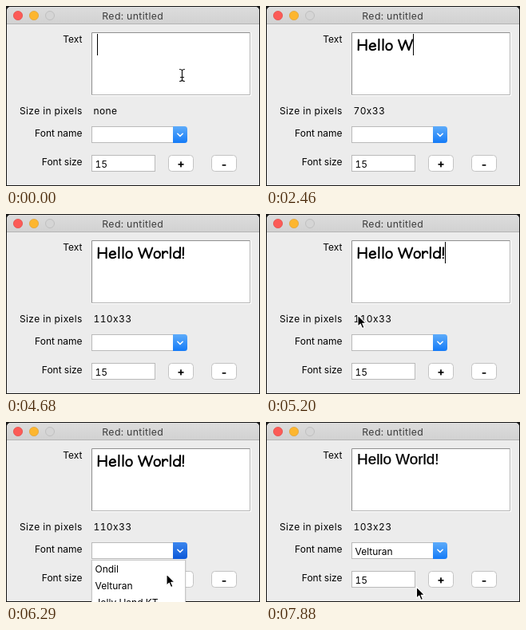
Animation of 318x226 px, one loop 8 s. Source, as an HTML page:

```html
<!DOCTYPE html>
<html lang="en">
<head>
<meta charset="utf-8">
<title>Font size demo</title>
<style>
html, body { margin: 0; width: 100%; height: 100%; overflow: hidden; background: #161616; }
svg { display: block; width: 100vw; height: 100vh; }
text { font: 12px Inter, Roboto, sans-serif; font-variant-numeric: tabular-nums; fill: #000; white-space: pre; }
.label { text-anchor: end; }
.mid { text-anchor: middle; }
.wide { letter-spacing: .4px; }
.title { font-size: 12.3px; letter-spacing: .35px; fill: #3c3c3c; }
.bold { font-weight: 700; font-size: 14px; }
.plain { font: 18.9px "Liberation Sans", sans-serif; stroke: #000; stroke-width: .25; }
.ink { fill: none; stroke: #000; stroke-width: 2.1; stroke-linecap: round; stroke-linejoin: round; }
.field { fill: #fff; stroke: #bababa; }
.button { fill: #fff; stroke: #c3c3c3; }
</style>
</head>
<body>
<svg viewBox="0 0 318 226">
  <defs>
    <linearGradient id="bar" x2="0" y2="1">
      <stop stop-color="#dcdcdc"/><stop offset="1" stop-color="#d2d2d2"/>
    </linearGradient>
    <linearGradient id="blue" x2="0" y2="1">
      <stop stop-color="#5eacfa"/><stop offset="1" stop-color="#147bf7"/>
    </linearGradient>
    <linearGradient id="pressed" x2="0" y2="1">
      <stop stop-color="#3c86ee"/><stop offset="1" stop-color="#0b58d8"/>
    </linearGradient>
    <path id="beamShape" d="M-3-7.5Q-.5-7.5 0-6Q.5-7.5 3-7.5M0-6V6M-3 7.5Q-.5 7.5 0 6Q.5 7.5 3 7.5M-2 2.5H2"/>
  </defs>

  <rect width="318" height="226" fill="#161616"/>
  <path d="M1 225V6a5 5 0 0 1 5-5H312a5 5 0 0 1 5 5V225z" fill="#ececec"/>
  <path d="M1 22V6a5 5 0 0 1 5-5H312a5 5 0 0 1 5 5V22z" fill="url(#bar)"/>
  <path d="M1 22.5H317" stroke="#b4b4b4"/>
  <circle cx="15" cy="12" r="5.6" fill="#fc5b57" stroke="#e2463f" stroke-width=".7"/>
  <circle cx="35" cy="12" r="5.6" fill="#fdb62f" stroke="#dfa033" stroke-width=".7"/>
  <circle cx="55" cy="12" r="5.5" fill="#d5d5d5" stroke="#bdbdbd" stroke-width=".9"/>
  <text class="mid title" x="158.7" y="17">Red: untitled</text>

  <text class="label" x="95.5" y="46">Text</text>
  <text class="label wide" x="95.8" y="136">Size in pixels</text>
  <text class="label" x="95.5" y="164">Font name</text>
  <text class="label" x="95.5" y="200">Font size</text>

  <rect x="107" y="33" width="200" height="80" fill="#fff"/>
  <path d="M107.5 112V33.5H306" fill="none" stroke="#8f8f8f"/>
  <path d="M107 111.5H305.5V33" fill="none" stroke="#b4b4b4"/>
  <g id="hand" class="ink" transform="translate(114 56)"></g>
  <text id="plain" class="plain" x="114" y="52.5">Hello World!</text>
  <rect id="caret" y="35" width="1"/>

  <text id="size" class="wide" x="109.5" y="136"></text>

  <rect class="field" x="107.5" y="151.5" width="110" height="20"/>
  <path id="drop" d="M209 151H223.5a3.5 3.5 0 0 1 3.5 3.5V168.500a3.5 3.5 0 0 1-3.5 3.5H209z"/>
  <path d="M214.8 160.2l3.2 3.2 3.2-3.2" fill="none" stroke="#fff" stroke-width="1.5" stroke-linecap="round"/>
  <text id="chosen" x="111.5" y="167">Velturan</text>

  <rect class="field" x="107.5" y="187.5" width="79" height="20"/>
  <text x="111.5" y="203">15</text>
  <rect class="button" x="203.5" y="187.5" width="31" height="20" rx="4"/>
  <rect class="button" x="257.5" y="187.5" width="31" height="20" rx="4"/>
  <text class="mid bold" x="219" y="203">+</text>
  <text class="mid bold" x="273" y="203.5">-</text>

  <g id="menu">
    <rect x="106" y="173" width="120" height="60" opacity=".05"/>
    <rect x="107.5" y="173.5" width="117" height="60" fill="#fff" stroke="#c8c8c8"/>
    <rect id="hover" x="108" y="195" width="116" height="20" fill="#0b63d8"/>
    <text x="111.5" y="189">Ondil</text>
    <text id="item" x="111.5" y="210">Velturan</text>
    <text x="111.5" y="231">Jolly Hand KT</text>
  </g>

  <g id="beam" fill="none" stroke-linecap="round">
    <use href="#beamShape" stroke="#fff" stroke-width="2.6"/>
    <use href="#beamShape" stroke="#111" stroke-width="1.2"/>
  </g>
  <path id="arrow" d="M0 0V14.2L3.3 11.2L5.6 16.6L8 15.6L5.7 10.4H10.2z" stroke="#fff" stroke-width="1.1" stroke-linejoin="round"/>
</svg>
<script>
const LOOP = 8000, EM = 18.87, PHRASE = 'Hello World!';
const $ = id => document.getElementById(id);
const show = (id, on) => { $(id).style.display = on ? '' : 'none'; };

// Handwritten face: advance in em, pen strokes in px above the baseline.
const glyphs = {
  H: [.768, 'M1.9-13.4L1.7-.8M11.6-13.5V-.7M1.8-6.9L11.5-7.3'],
  e: [.548, 'M1.6-4.7L8.6-5.6C8.3-8.2 6.8-9.2 5.2-9.2C2.8-9.2 1.2-6.8 1.2-4.5C1.2-2 2.8-.7 5-.7C6.5-.7 7.8-1.2 8.6-2.1'],
  l: [.274, 'M2.6-14.1L2.5-.8'],
  o: [.527, 'M4.6-9C2.5-9 1.2-6.9 1.2-4.7C1.2-2.3 2.7-.7 4.7-.7C7-.7 8.6-2.5 8.6-4.9C8.6-7.3 7-9 4.6-9'],
  ' ': [.299, ''],
  W: [1.039, 'M1.2-13.3L5.4-.9L9.9-12.7L14-.9L18.5-13.5'],
  r: [.48, 'M1.8-9L2-.8M2-5.6C3-8 4.5-9 6-9C7.2-9 7.9-8.3 8-7'],
  d: [.588, 'M9.4-14L9.3-.7M9.3-6.9C8.2-8.3 7-9 5.6-9C3-9 1.4-7 1.4-4.5C1.4-2 3-.7 5-.7C7.2-.7 8.8-2.2 9.3-4.2'],
  '!': [.238, 'M2.4-13.8L2.2-4.2M2.2-.9V-.8']
};
const keyTimes = [980, 1170, 1440, 1530, 1720, 2000, 2460, 2740, 2890, 3070, 3600, 4060];

// Held pointer positions: time, x, y.
const pointer = [
  [5050, 190, 99], [5110, 140, 116], [5200, 115, 127], [5290, 117, 131], [5380, 136, 140],
  [5470, 168, 151], [5560, 200, 159], [5650, 214, 161], [5740, 217, 160],
  [6200, 211, 174], [6290, 201, 191], [6380, 195, 200], [6470, 191, 205], [6560, 189, 206], [6620, 188.5, 207]
];
const caretOff = [[520, 980], [4680, 5050], [5650, 7290], [7880, LOOP]];

const widths = [0];
const strokes = [...PHRASE].map((c, i) => {
  const [advance, d] = glyphs[c];
  const p = document.createElementNS('http://www.w3.org/2000/svg', 'path');
  p.setAttribute('d', d);
  p.setAttribute('transform', `translate(${widths[i]} 0)`);
  widths.push(widths[i] + advance * EM);
  return $('hand').appendChild(p);
});

function place(id, x, y) {
  $(id).setAttribute('transform', `translate(${x} ${y})`);
}

function draw(t) {
  const typed = keyTimes.filter(k => k <= t).length;
  const open = t >= 5830 && t < 7290, hover = open && t >= 7050, changed = t >= 7290;
  const width = changed ? 103 : Math.round(widths[typed]);

  strokes.forEach((p, i) => { p.style.display = i < typed ? '' : 'none'; });
  $('hand').setAttribute('aria-label', PHRASE.slice(0, typed));
  show('hand', !changed);
  show('plain', changed);
  show('chosen', changed);
  $('size').textContent = typed ? `${width}x${changed ? 23 : 33}` : 'none';

  $('caret').setAttribute('x', 114 + width);
  $('caret').setAttribute('height', changed ? 22 : 27);
  show('caret', !caretOff.some(([a, b]) => t >= a && t < b));

  show('menu', open);
  show('hover', hover);
  $('item').style.fill = hover ? '#fff' : '#000';
  $('drop').setAttribute('fill', open ? 'url(#pressed)' : 'url(#blue)');

  const at = pointer.filter(p => p[0] <= t).pop();
  const [, x, y] = at || [0, 220.5, 87];
  const inText = y < 113;
  show('beam', inText && (at || t < 980));
  show('arrow', !inText);
  place(inText ? 'beam' : 'arrow', x, y);
}

const start = performance.now();
function tick() {
  draw((performance.now() - start) % LOOP);
  requestAnimationFrame(tick);
}
tick();
</script>
</body>
</html>
```
